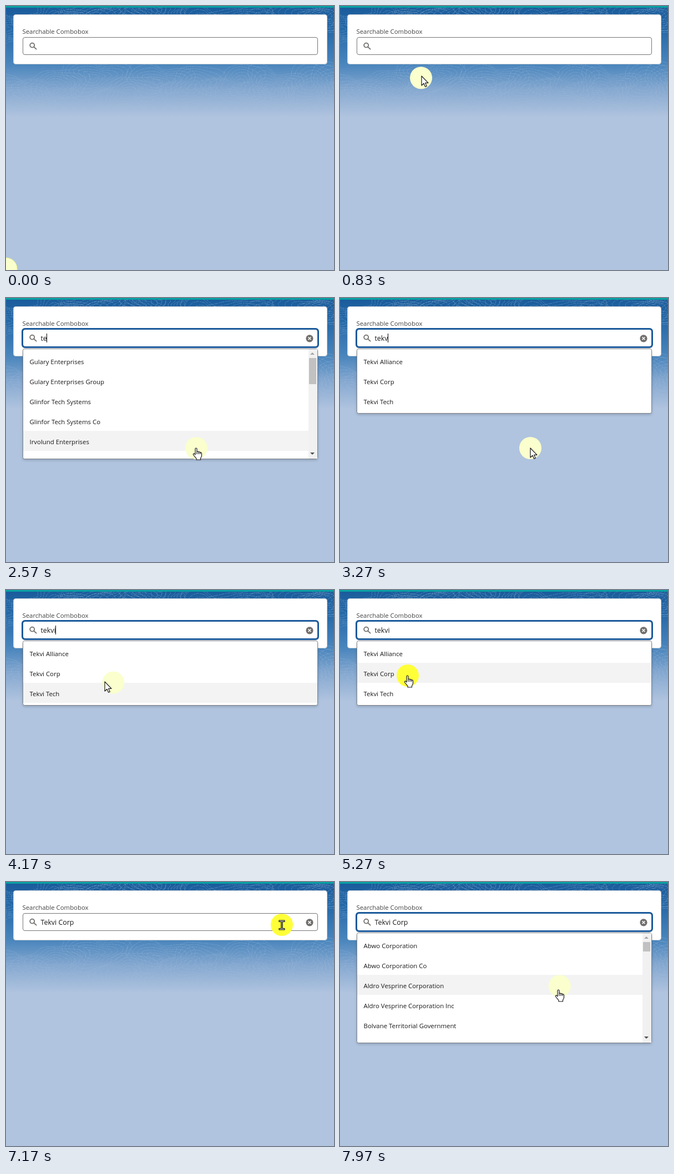
An HTML page for the animation above (8 s loop, 591 by 475 pixels).

```html
<!DOCTYPE html>
<html lang="en">
<head>
<meta charset="utf-8">
<title>Searchable Combobox</title>
<style>
  html, body { margin: 0; width: 100%; height: 100%; overflow: hidden; background: #b0c4df; }
  svg { display: block; width: 591px; height: 475px; font: 11.4px "Open Sans", "Noto Sans", sans-serif; fill: #181818; }
  #contours path { fill: none; stroke: url(#fade); stroke-width: .8; stroke-dasharray: 3 1 6 1.5; }
  #panel { filter: drop-shadow(0 2px 2px rgba(0, 0, 0, .18)); }
  #cursor path { stroke: #1a1a1a; stroke-width: 1.2; stroke-linejoin: round; fill: #fff; }
</style>
</head>
<body>
<svg viewBox="0 0 591 475">
  <defs>
    <linearGradient id="sky" x2="0" y2="1">
      <stop offset="0" stop-color="#1a5b9b"/>
      <stop offset=".2" stop-color="#2468a7"/>
      <stop offset=".53" stop-color="#4b86bd"/>
      <stop offset=".75" stop-color="#85a8d0"/>
      <stop offset="1" stop-color="#b0c4df"/>
    </linearGradient>
    <linearGradient id="fade" gradientUnits="userSpaceOnUse" x1="0" y1="0" x2="0" y2="195">
      <stop offset="0" stop-color="#fff" stop-opacity=".28"/>
      <stop offset=".6" stop-color="#fff" stop-opacity=".18"/>
      <stop offset="1" stop-color="#fff" stop-opacity="0"/>
    </linearGradient>
  </defs>

  <rect width="591" height="475" fill="#b0c4df"/>
  <rect width="591" height="200" fill="url(#sky)"/>
  <g id="contours"></g>
  <rect width="591" height="3" fill="#08a0a3"/>

  <rect x="13.5" y="15.5" width="565" height="89" rx="4" fill="#fff" stroke="#c3cad3"/>
  <text x="29.5" y="50" font-size="11.35" fill="#444">Searchable Combobox</text>
  <rect x="30.5" y="56.5" width="531" height="31" rx="3.5" fill="#fff" stroke="#747474"/>
  <rect id="ring" x="29.5" y="55.5" width="533" height="33" rx="4.5" fill="none" stroke="#1b5a9c" stroke-width="3"/>
  <g fill="none" stroke="#706e6b" stroke-width="1.8" stroke-linecap="round">
    <circle cx="47.2" cy="70.6" r="4"/>
    <path d="M50.5 73.8L54.6 77.6"/>
  </g>
  <text id="query" x="62.5" y="77" font-size="12.35"></text>
  <rect id="caret" y="64" width="1" height="16" fill="#000"/>
  <g id="clear">
    <circle cx="547" cy="72.8" r="6.6" fill="#706e6b"/>
    <path d="M544.5 70.3l5 5m0-5l-5 5" stroke="#fff" stroke-width="1.6"/>
  </g>

  <g id="panel">
    <rect id="sheet" x="30.5" y="91.5" width="531" rx="3" fill="#fff" stroke="#7d8087"/>
    <rect id="hover" x="31" height="36" fill="#f3f3f3"/>
    <g id="rows"></g>
    <g id="scrollbar">
      <rect x="545" y="92" width="16" height="197" fill="#f1f1f1"/>
      <rect id="thumb" x="546" y="108" width="13" fill="#c1c1c1"/>
      <path d="M548 102h8l-4-4z" fill="#a3a3a3"/>
      <path d="M548 278h8l-4 4z" fill="#505050"/>
    </g>
  </g>

  <circle id="glow" r="20"/>
  <g id="cursor">
    <path id="arrow" d="M0 0V17L4 13.3 6.6 19.3 9.3 18.2 6.7 12.3H12Z"/>
    <path id="hand" d="M-2 1.5a1.5 1.5 0 0 1 3 0V6.5c1-.8 2.7-.5 3 .7 1-.7 2.5-.3 2.8.8 1.2-.5 2.7.2 2.7 1.8V14c0 2-2 3-2 5v2H0V19C-1 17-4 14.5-5.5 12c-.8-1.5 1-2.8 2.3-1.5L-2 12ZM1 6.5V11M4 7.5V11M6.8 8.3V11"/>
    <path id="beam" d="M-5-8H5V-5.5H1.2V6.5H5V9H-5V6.5H-1.2V-5.5H-5Z" style="fill:#aaa"/>
  </g>
</svg>

<script>
const LOOP = 8000, GLOW_LAG = 33, HOVER_LAG = 66, ROW_TOP = 95, ROW = 36;
const $ = id => document.getElementById(id);
const show = (id, on) => $(id).setAttribute('display', on ? 'inline' : 'none');
const set = (id, attrs) => { for (const k in attrs) $(id).setAttribute(k, attrs[k]); };
const svgNode = (tag, parent) =>
  parent.appendChild(document.createElementNS('http://www.w3.org/2000/svg', tag));

const LISTS = {
  all: { thumb: 17, names: ['Abwo Corporation', 'Abwo Corporation Co', 'Aldro Vesprine Corporation',
    'Aldro Vesprine Corporation Inc', 'Bolvane Territorial Government'] },
  broad: { thumb: 47, names: ['Gulary Enterprises', 'Gulary Enterprises Group', 'Glinfor Tech Systems',
    'Glinfor Tech Systems Co', 'Irvolund Enterprises'] },
  narrow: { thumb: 80, names: ['Gulary Enterprises', 'Gulary Enterprises Group', 'Irvolund Enterprises',
    'Irvolund Enterprises Inc', 'Tekvi Alliance'] },
  exact: { thumb: 0, names: ['Tekvi Alliance', 'Tekvi Corp', 'Tekvi Tech'] }
};

// Schedules: [start time, value]
const QUERY = [[0, ''], [2300, 't'], [2530, 'te'], [2970, 'tek'], [3270, 'tekv'], [3670, 'tekvi'], [5300, 'Tekvi Corp']];
const LIST = [[0, null], [1330, 'all'], [2570, 'broad'], [3000, 'narrow'], [3270, 'exact'], [5330, null], [7270, 'all']];
const FOCUS = [[0, false], [1300, true], [5330, false], [7210, true]];
const PRESSED = [[0, false], [1230, true], [1340, false], [5200, true], [5340, false], [7120, true], [7280, false]];
const POINTER = [[0, 'arrow'], [990, 'beam'], [1450, 'hand'], [3270, 'arrow'], [4200, 'hand'],
  [5370, 'arrow'], [6830, 'beam'], [7560, 'hand']];

// Pointer path: [time, x, y]
const PATH = [
  [-100, 0, 473], [100, 0, 473], [300, 68, 430], [450, 116, 362], [620, 138, 290], [797, 146, 130], [830, 147, 126],
  [900, 152, 97], [1070, 185, 72], [1370, 185, 72], [1700, 338, 286], [1970, 343, 270], [3940, 343, 270],
  [4137, 194, 167], [4170, 178, 165], [4370, 122, 154], [5840, 122, 154], [6237, 265, 116], [6270, 285, 113],
  [6620, 574, 56], [6700, 574, 56], [7090, 497, 77], [7440, 497, 77], [7937, 396, 187], [7970, 394, 194], [8040, 390, 207]
];

const entryAt = (schedule, t) => schedule.findLast(e => e[0] <= t) || schedule[0];
const valueAt = (schedule, t) => entryAt(schedule, t)[1];

function tangent(i, axis) {
  const [a, b, c] = [PATH[i - 1], PATH[i], PATH[i + 1]];
  if (!a || !c || a[axis] === b[axis] || b[axis] === c[axis]) return 0;
  return (c[axis] - a[axis]) / (c[0] - a[0]);
}

function pointerAt(t) {
  const i = Math.max(0, PATH.findLastIndex(p => p[0] <= t));
  const a = PATH[i], b = PATH[i + 1], span = b[0] - a[0], u = (t - a[0]) / span;
  const blend = u * u * (3 - 2 * u);
  return [1, 2].map(k => a[k] + (b[k] - a[k]) * blend
    + span * u * (1 - u) * (tangent(i, k) * (1 - u) - tangent(i + 1, k) * u));
}

function drawContours() {
  let seed = 7;
  const random = () => (seed = seed * 16807 % 2147483647) / 2147483647;
  for (let n = 0; n < 20; n++) {
    const cx = (n % 10) * 65 + random() * 30, cy = (n < 10 ? 5 : 125) + random() * 40;
    const phase = random() * 6, lobes = 2 + Math.floor(random() * 3);
    for (let r = 6; r < 46; r += 6) {
      let d = '';
      for (let a = 0; a < 6.28; a += .2) {
        const k = r * (1 + .25 * Math.sin(lobes * a + phase) + .1 * Math.sin(5 * a + r / 9));
        d += `${d ? 'L' : 'M'}${(cx + 1.4 * k * Math.cos(a)).toFixed(1)} ${(cy + .8 * k * Math.sin(a)).toFixed(1)}`;
      }
      svgNode('path', $('contours')).setAttribute('d', d + 'Z');
    }
  }
}

const rows = Array.from({ length: 5 }, (_, i) => {
  const text = svgNode('text', $('rows'));
  text.setAttribute('x', 42.5);
  text.setAttribute('y', ROW_TOP + ROW * i + 24);
  return text;
});

function drawInput(t) {
  const [typedAt, query] = entryAt(QUERY, t), [focusedAt, focused] = entryAt(FOCUS, t);
  $('query').textContent = query;
  show('ring', focused);
  show('clear', query);
  const blinkOn = Math.floor((t - Math.max(typedAt, focusedAt)) / 530) % 2 === 0;
  show('caret', focused && blinkOn);
  set('caret', { x: Math.floor(62.5 + $('query').getComputedTextLength()) });
}

function drawList(t) {
  const list = LISTS[valueAt(LIST, t)];
  show('panel', list);
  if (!list) return;
  const { names, thumb } = list;
  rows.forEach((row, i) => row.textContent = names[i] || '');
  set('sheet', { height: thumb ? 198 : 116 });
  show('scrollbar', thumb);
  set('thumb', { height: thumb });
  const index = Math.floor((pointerAt(t - HOVER_LAG)[1] - ROW_TOP) / ROW);
  const over = index >= 0 && index < names.length;
  show('hover', over);
  if (over) set('hover', { y: ROW_TOP + ROW * index, width: thumb ? 514 : 530 });
}

function draw(t) {
  const tip = pointerAt(t), [cx, cy] = pointerAt(t - GLOW_LAG);
  drawInput(t);
  drawList(t);
  set('glow', { cx, cy, fill: valueAt(PRESSED, t) ? '#ffff38' : '#faffcd', stroke: t < 100 ? '#eef58a' : 'none' });
  const shape = valueAt(POINTER, t);
  ['arrow', 'hand', 'beam'].forEach(id => show(id, id === shape));
  set('cursor', { transform: `translate(${tip.map(Math.round)})` });
  show('cursor', t >= 100);
}

drawContours();
const start = performance.now();
(function tick() {
  draw((performance.now() - start) % LOOP);
  requestAnimationFrame(tick);
})();
</script>
</body>
</html>
```
